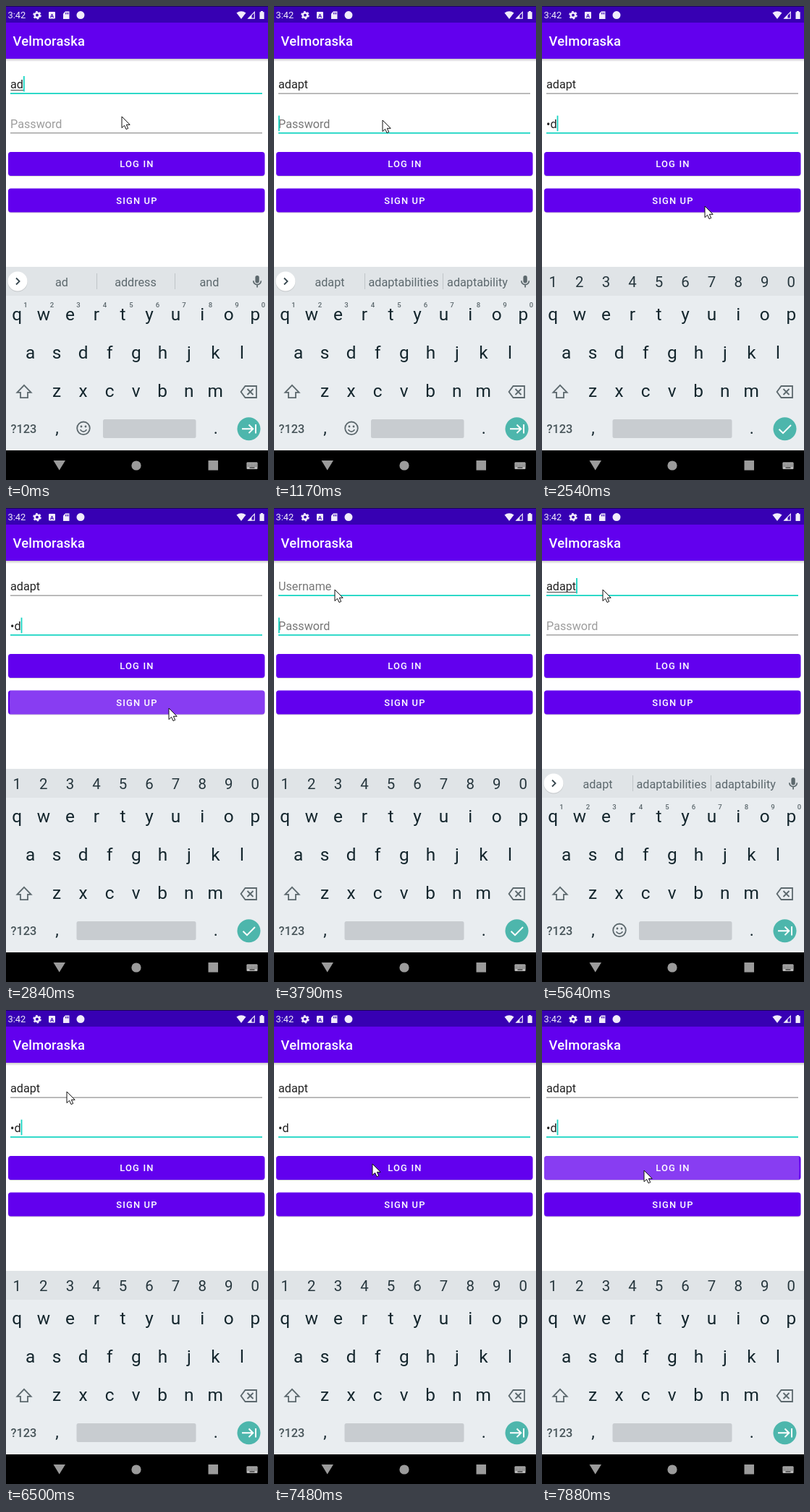
These frames come from a looping animation (362 px wide and 656 px high, 8 s). An HTML page:

```html
<!DOCTYPE html>
<html lang="en">
<head>
<meta charset="utf-8">
<title>Login screen</title>
<style>
  html, body { margin: 0; width: 100%; height: 100%; overflow: hidden; background: #fff; }
  svg { display: block; width: 362px; height: 656px; }
  text { font-family: Roboto, "Noto Sans", sans-serif; white-space: pre; }
</style>
</head>
<body>
<svg id="stage" viewBox="0 0 362 656" xmlns="http://www.w3.org/2000/svg">
  <defs>
    <linearGradient id="shade" x1="0" y1="0" x2="0" y2="1">
      <stop offset="0" stop-color="#000" stop-opacity=".22"/>
      <stop offset="1" stop-color="#000" stop-opacity="0"/>
    </linearGradient>
  </defs>
</svg>
<script>
const NS = 'http://www.w3.org/2000/svg';
const stage = document.getElementById('stage');
const LOOP = 8000;
const TEAL = '#18d5c3', KEY = '#14262d', DIM = '#5c686d', PURPLE = '#6200ee';

function add(tag, attrs, parent = stage) {
  const el = document.createElementNS(NS, tag);
  set(el, attrs);
  parent.append(el);
  return el;
}
function set(el, attrs) {
  for (const k in attrs) el.setAttribute(k, attrs[k]);
}
const group = (parent) => add('g', {}, parent);
const rect = (x, y, width, height, fill, parent, more) =>
  add('rect', { x, y, width, height, fill, ...more }, parent);
const disc = (cx, cy, r, fill, parent, more) =>
  add('circle', { cx, cy, r, fill, ...more }, parent);
const shape = (d, fill, parent) => add('path', { d, fill }, parent);
const line = (d, stroke, width, parent) =>
  add('path', { d, stroke, fill: 'none', 'stroke-width': width }, parent);
function label(str, x, y, size, fill, parent, more) {
  const el = add('text', { x, y, 'font-size': size, fill, ...more }, parent);
  el.textContent = str;
  return el;
}
const MID = { 'text-anchor': 'middle' };

function drawBars() {
  rect(0, 73, 362, 4, 'url(#shade)');
  rect(0, 0, 362, 23, '#3700b3');
  rect(0, 0, 362, 1, '#1b0658');
  rect(0, 23, 362, 50, PURPLE);
  label('Velmoraska', 9.5, 55, 18.4, '#fff', stage, { 'font-weight': 500, 'letter-spacing': .2 });

  const ink = '#f1ecfb';
  label('3:42', 2.5, 17.3, 12.9, ink);
  disc(43, 12.7, 3.2, 'none', stage, { stroke: ink, 'stroke-width': 2.6 });
  disc(43, 12.7, 4.9, 'none', stage, { stroke: ink, 'stroke-width': 1.8, 'stroke-dasharray': '2.6 2.53' });
  rect(59, 8, 9, 9.5, ink, stage, { rx: 1 });
  label('A', 63.5, 15.6, 7.5, '#3700b3', stage, { ...MID, 'font-weight': 700 });
  shape('M82 7.5H87.5V18H79V10.5Z', ink);
  line('M82.5 9V11.5M84.3 9V11.5M86 9V11.5', '#3700b3', .9);
  disc(103, 12.6, 5.5, ink);
  shape('M318.5 9.6Q325 5 331.5 9.6L325 18Z', ink);
  line('M334.8 17.2H343.3V8.4Z', ink, 1.2);
  shape('M339.5 12.6V17.6H334.5Z', ink);
  shape('M350.5 8.2H352V7H355V8.2H356.7V18H350.5Z', ink);

  rect(0, 615, 362, 41, '#000');
  const nav = '#9b9b9b';
  shape('M65.5 629H82L73.7 642.5Z', nav);
  disc(180, 636, 6.6, nav);
  rect(279.5, 629, 13.5, 13.5, nav);
  rect(332.5, 631.5, 15, 9.5, '#b8b8b8', stage, { rx: 1 });
  line('M334 634H346M334 636.6H346', '#000', 1).setAttribute('stroke-dasharray', '1 1.2');
  line('M336.5 639H343.5', '#000', 1);
}

function makeButton(id, y, str) {
  rect(3, y + 1, 354.5, 33, '#000', stage, { rx: 4, opacity: .16 });
  rect(3, y, 354.5, 33, PURPLE, stage, { rx: 3.7 });
  const clip = add('clipPath', { id });
  rect(3, y, 354.5, 33, '#000', clip, { rx: 3.7 });
  const wave = disc(0, 0, 0, '#fff', stage, { 'clip-path': `url(#${id})` });
  label(str, 180.9, y + 21.4, 12.9, '#fff', stage,
    { ...MID, 'font-weight': 500, 'letter-spacing': 1.15 });
  return wave;
}

function makeField(hint, base) {
  const f = { hint, base };
  f.rule = rect(6, 0, 348, 1, '#777');
  f.text = label('', 6, base, 16.2, '#222');
  f.under = rect(6.5, base + 2, 0, 1, '#444');
  f.caret = rect(0, base - 17, 1.8, 21.5, TEAL);
  return f;
}

function updateField(f, value, focused, caret, composing) {
  f.text.textContent = value || f.hint;
  set(f.text, { fill: value ? '#222' : focused ? '#777' : '#9d9d9d' });
  const w = value ? f.text.getComputedTextLength() : 0;
  set(f.under, { width: composing ? w : 0 });
  set(f.caret, { x: 6 + w, opacity: caret ? 1 : 0 });
  set(f.rule, focused
    ? { y: f.base + 6.2, height: 1.8, fill: TEAL }
    : { y: f.base + 6.6, height: 1, fill: '#777' });
}

function drawKeyboard() {
  rect(0, 361, 362, 40, '#e0e4e7');
  rect(0, 401, 362, 214, '#e9edf0');
  const rows = [['qwertyuiop', 15.3, 435], ['asdfghjkl', 33.6, 488], ['zxcvbnm', 70, 541]];
  for (const [keys, x0, y] of rows)
    [...keys].forEach((k, i) => label(k, x0 + i * 36.55, y, 24.4, KEY, stage, MID));

  line('M25 524.8L34.6 534.8H30V542.2H20V534.8H15.4Z', DIM, 1.8);
  line('M330.5 526H346V542H330.5L324.6 534ZM333.5 530L341.5 538M341.5 530L333.5 538', DIM, 1.8);
  label('?123', 6.5, 590.5, 16.4, '#48555a', stage, { 'font-weight': 500 });
  label(',', 70.5, 592, 23, KEY, stage, MID);
  label('.', 289.8, 592, 23, KEY, stage, MID);
  disc(335.5, 585.3, 16, '#4db6ac');
}

function makeStrip() {
  const words = group(), digits = group();
  disc(16, 382, 13.6, '#000', words, { opacity: .13 });
  disc(16, 381, 13.5, '#fff', words);
  line('M14 376.5L18.6 381L14 385.5', '#37474f', 1.8, words);
  line('M125.5 370V392M233.5 370V392', '#bfc5c8', 1, words);
  rect(344.4, 373, 5.4, 10.4, DIM, words, { rx: 2.7 });
  line('M341.8 380.3A5.3 5.3 0 0 0 352.4 380.3M347.1 385.5V389.5', DIM, 1.7, words);
  [...'1234567890'].forEach((d, i) => {
    label(d, 27 + i * 36.5, 417, 9.6, DIM, words, { ...MID, 'font-weight': 500 });
    label(d, 15.3 + i * 36.55, 389.3, 20.4, '#26363d', digits, MID);
  });
  disc(107, 584.3, 8.8, 'none', words, { stroke: DIM, 'stroke-width': 1.8 });
  disc(104, 582, 1.4, DIM, words);
  disc(110, 582, 1.4, DIM, words);
  line('M102.5 586.3Q107 592 111.5 586.3', DIM, 1.7, words);
  const slots = [77, 179, 281].map(x => label('', x, 388, 16.2, DIM, words, MID));
  return { words, digits, slots };
}

drawBars();
const waves = { login: makeButton('login', 202, 'LOG IN'), signup: makeButton('signup', 252.5, 'SIGN UP') };
const user = makeField('Username', 114);
const pass = makeField('Password', 168.7);
drawKeyboard();
const strip = makeStrip();
const space = rect(134, 572, 128.5, 26, '#c8ccd0', stage, { rx: 2.5 });
const next = line('M326 585.3H341M335.5 579.5L341.3 585.3L335.5 591.1M345 579V591.6', '#fff', 2);
const check = line('M327.5 585.8L333 591.2L344 580', '#fff', 2);
const pointer = add('path', {
  d: 'M0 0V15.6L3.6 12.3L6 17.6L8.7 16.4L6.3 11.3H11.2Z',
  fill: '#fff', stroke: '#111', 'stroke-width': 1
});

// Each step changes part of the state from its time onward.
const steps = [
  [0, { user: 'ad', pass: '', focus: 'u', at: 'u', caret: true, typing: true, pad: 'words',
        enter: 'next', words: ['ad', 'address', 'and'], mouse: [160, 153], ripple: null }],
  [150, { user: 'ada', words: ['ada', 'adapt', 'adapted'] }],
  [270, { user: 'adap', words: ['adap', 'adapt', 'adaptive'] }],
  [390, { user: 'adapt', words: ['adapt', 'adaptabilities', 'adaptability'] }],
  [760, { mouse: [157, 155] }],
  [900, { mouse: [152, 157], caret: false }],
  [1030, { mouse: [150, 158] }],
  [1170, { focus: 'p', at: 'p', caret: true, typing: false }],
  [1320, { pad: 'digits', enter: 'check' }],
  [1600, { pass: '•d' }],
  [1880, { mouse: [158, 135] }],
  [2020, { mouse: [176, 104] }],
  [2150, { mouse: [198, 150], caret: false }],
  [2290, { mouse: [215, 215] }],
  [2420, { mouse: [223, 262] }],
  [2540, { mouse: [225, 277], caret: true }],
  [2700, { ripple: ['signup', 225, 269, 100, .16] }],
  [2840, { ripple: ['signup', 225, 269, 220, .24] }],
  [2970, { ripple: null }],
  [3270, { pass: '••', mouse: [205, 240], caret: false }],
  [3390, { mouse: [140, 170] }],
  [3510, { mouse: [84, 116], caret: true }],
  [3790, { user: '', pass: '', focus: 'up', mouse: [84, 113] }],
  [3940, { focus: 'u', at: 'u', pad: 'words', enter: 'next', words: ['', '', ''] }],
  [4410, { user: 'ad', typing: true, words: ['ad', 'address', 'and'] }],
  [4970, { user: 'adn', words: ['adn', 'ADN', 'add'] }],
  [5380, { user: 'ad', words: ['ad', 'address', 'and'] }],
  [5510, { user: 'ada', words: ['ada', 'adapt', 'adapted'] }],
  [5640, { user: 'adapt', words: ['adapt', 'adaptabilities', 'adaptability'] }],
  [6070, { focus: 'p', at: 'p', typing: false }],
  [6190, { pad: 'digits' }],
  [6500, { pass: '•d' }],
  [7060, { mouse: [87, 118], caret: false }],
  [7200, { mouse: [100, 145] }],
  [7330, { mouse: [122, 185] }],
  [7470, { mouse: [136, 213] }],
  [7600, { mouse: [141, 222], caret: true }],
  [7740, { ripple: ['login', 141, 219, 100, .16] }],
  [7880, { ripple: ['login', 141, 219, 214.5, .24] }]
];

function stateAt(t) {
  const s = {};
  for (const [time, change] of steps) {
    if (time > t) break;
    Object.assign(s, change);
  }
  return s;
}

const show = (el, on) => set(el, { visibility: on ? 'visible' : 'hidden' });

function render(t) {
  const s = stateAt(t);
  updateField(user, s.user, s.focus.includes('u'), s.caret && s.at === 'u', s.typing);
  updateField(pass, s.pass, s.focus.includes('p'), s.caret && s.at === 'p', false);

  const wordy = s.pad === 'words';
  show(strip.words, wordy);
  show(strip.digits, !wordy);
  strip.slots.forEach((slot, i) => slot.textContent = s.words[i]);
  set(space, wordy ? { x: 134, width: 128.5 } : { x: 97.5, width: 165 });
  show(next, s.enter === 'next');
  show(check, s.enter === 'check');

  for (const name in waves) {
    const [target, cx, cy, r, opacity] = s.ripple || [];
    set(waves[name], target === name ? { cx, cy, r, opacity } : { r: 0 });
  }
  set(pointer, { transform: `translate(${s.mouse})` });
}

const start = performance.now();
function tick() {
  render((performance.now() - start) % LOOP);
  requestAnimationFrame(tick);
}
tick();
</script>
</body>
</html>
```
